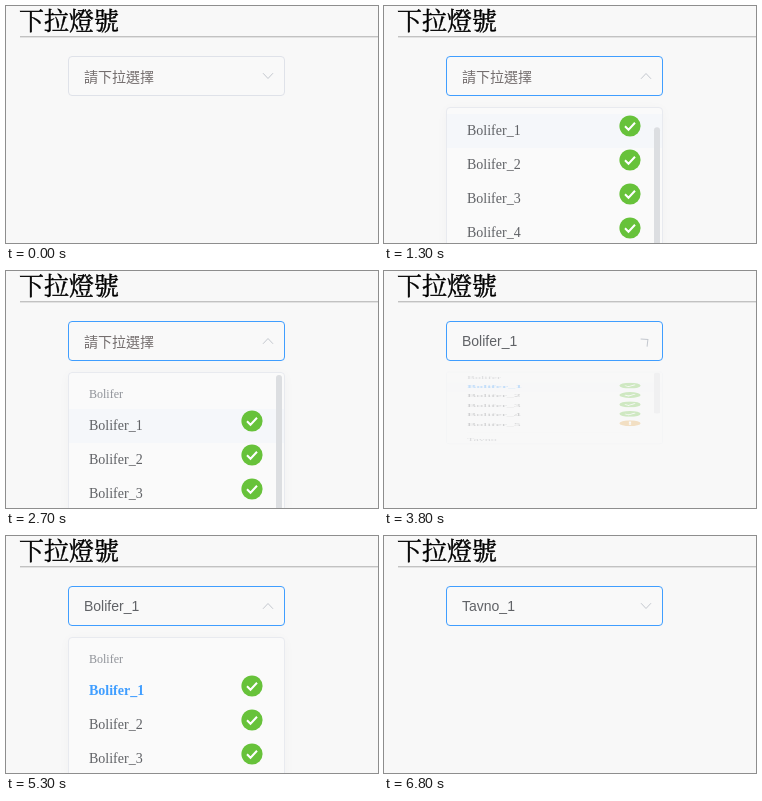
Write an HTML page that moves like this. It is 372x237 px and loops after 7.8 s.

```html
<!DOCTYPE html>
<html lang="zh-Hant">
<head>
<meta charset="utf-8">
<title>下拉燈號</title>
<style>
html, body { margin: 0; width: 100%; height: 100%; overflow: hidden; background: #f8f8f8; }
#stage { position: absolute; left: 0; top: 0; width: 372px; height: 237px; overflow: hidden; background: #f8f8f8; }
#stage * { box-sizing: border-box; }
h1 {
  position: absolute; left: 13px; top: -2px; margin: 0; color: #000; white-space: nowrap;
  font: 400 25px/30px "Noto Serif CJK TC", "Noto Sans CJK TC", "Noto Sans CJK", serif;
  -webkit-text-stroke: .4px #000;
}
.rule { position: absolute; left: 14px; right: 0; top: 30px; height: 2px; background: #c2c2c2; border-bottom: 1px solid #e2e2e2; }
.input {
  position: absolute; left: 62px; top: 50px; width: 217px; height: 40px;
  border: 1px solid #dfe2e9; border-radius: 4px; background: #f9f9f9;
}
.input.focus { border-color: #409eff; }
.value {
  position: absolute; left: 15px; top: 0; white-space: nowrap; color: #606266;
  font: 14px/38px "Liberation Sans", Arial, sans-serif;
}
.value.empty { color: #746e6e; font-family: "Noto Sans CJK TC", "Noto Sans CJK", sans-serif; }
.arrow { position: absolute; left: 192px; top: 12px; width: 14px; height: 14px; }
.popper {
  position: absolute; left: 62px; top: 101px; width: 217px; height: 259px; transform-origin: 50% 0;
  border: 1px solid #e8eaef; border-radius: 4px; background: #fafafa;
  box-shadow: 0 2px 12px rgba(0, 0, 0, .03);
}
.view { position: absolute; inset: 0; overflow: hidden; border-radius: 3px; }
.list { padding: 6px 0; font-family: "Liberation Serif", "Times New Roman", serif; }
.group { position: relative; }
.group:first-child { padding-bottom: 24px; }
.group:first-child::after {
  content: ""; position: absolute; left: 20px; right: 20px; bottom: 12px; height: 1px; background: #e4e7ed;
}
.label { padding-left: 20px; font-size: 12px; line-height: 30px; color: #909399; }
.item { position: relative; height: 34px; padding-left: 20px; font-size: 14px; line-height: 34px; color: #606266; }
.item.hover { background: #f5f7fa; }
.item.chosen { color: #409eff; font-weight: bold; }
.item svg { position: absolute; left: 172px; top: 1px; width: 22px; height: 22px; }
.bar { position: absolute; right: 2px; top: 2px; width: 6px; height: 147px; border-radius: 4px; background: #dcdee1; }
</style>
</head>
<body>
<div id="stage">
  <h1>下拉燈號</h1>
  <div class="rule"></div>
  <div class="input">
    <span class="value"></span>
    <svg class="arrow" viewBox="-7 -7 14 14"><path d="M-5 2.8L0-2.5L5 2.8" fill="none" stroke="#c4c8cf"/></svg>
  </div>
  <div class="popper">
    <div class="view"><div class="list"></div></div>
    <div class="bar"></div>
  </div>
</div>
<script>
const LOOP = 7800, BAR_RATIO = 0.578;
const $ = s => document.querySelector(s);
const input = $('.input'), value = $('.value'), arrow = $('.arrow path');
const popper = $('.popper'), list = $('.list'), bar = $('.bar');

const CHECK = '<path d="M-5 .2L-1.5 3.7L5-3.2" fill="none" stroke="#fff" stroke-width="2"/>';
const BANG = '<path d="M0-6V1.8M0 3.8V6" fill="none" stroke="#fff" stroke-width="2.2"/>';
const icon = ok => `<svg viewBox="-11 -11 22 22"><circle r="10.6" fill="${ok ? '#67c23a' : '#e6a23c'}"/>${ok ? CHECK : BANG}</svg>`;

const groups = [
  { name: 'Bolifer', count: 5, warn: 5 },
  { name: 'Tavno', count: 6 }
];
list.innerHTML = groups.map(({ name, count, warn }) => {
  let html = `<div class="group"><div class="label">${name}</div>`;
  for (let n = 1; n <= count; n++) html += `<div class="item">${name}_${n}${icon(n !== warn)}</div>`;
  return html + '</div>';
}).join('');
const items = [...document.querySelectorAll('.item')];

// Each step lists only what changes at its time.
const steps = [
  [0, { focus: false, open: 0, scroll: 0, turn: 180, pick: -1, hover: -1, bar: false }],
  [500, { focus: true }],
  [700, { open: 0.435, turn: 135 }],
  [800, { open: 0.9, turn: 32 }],
  [900, { open: 0.99, turn: 4 }],
  [1000, { open: 1, turn: 0 }],
  [1300, { scroll: 30, hover: 0, bar: true }],
  [1400, { scroll: 125, hover: -1 }],
  [1500, { scroll: 179 }],
  [2500, { scroll: 177 }],
  [2600, { scroll: 75 }],
  [2700, { scroll: 0, hover: 0 }],
  [3800, { open: 0.277, turn: 50, pick: 0 }],
  [3900, { open: 0.05, turn: 148 }],
  [4000, { open: 0.004, turn: 176 }],
  [4100, { open: 0, turn: 180, hover: -1, bar: false }],
  [5000, { open: 0.435, turn: 135 }],
  [5100, { open: 0.9, turn: 32 }],
  [5200, { open: 0.99, turn: 4 }],
  [5300, { open: 1, turn: 0 }],
  [5400, { scroll: 30, bar: true }],
  [5500, { scroll: 125 }],
  [5600, { scroll: 179 }],
  [6500, { open: 0.277, turn: 50, pick: 5 }],
  [6600, { open: 0.05, turn: 148 }],
  [6700, { open: 0.004, turn: 176 }],
  [6800, { open: 0, turn: 180 }]
];

function draw(time) {
  const s = {};
  for (const [at, change] of steps) if (at <= time) Object.assign(s, change);
  input.classList.toggle('focus', s.focus);
  value.classList.toggle('empty', s.pick < 0);
  value.textContent = s.pick < 0 ? '請下拉選擇' : items[s.pick].textContent;
  arrow.setAttribute('transform', `rotate(${s.turn})`);
  popper.style.visibility = s.open ? 'visible' : 'hidden';
  popper.style.opacity = s.open;
  popper.style.transform = s.open < 1 ? `scaleY(${s.open})` : 'none';
  list.style.transform = `translateY(${-s.scroll}px)`;
  bar.style.opacity = s.bar ? 1 : 0;
  bar.style.transform = `translateY(${s.scroll * BAR_RATIO}px)`;
  items.forEach((el, i) => {
    el.classList.toggle('hover', i === s.hover);
    el.classList.toggle('chosen', i === s.pick);
  });
}

const start = performance.now();
function tick() {
  draw((performance.now() - start) % LOOP);
  requestAnimationFrame(tick);
}
tick();
</script>
</body>
</html>
```
